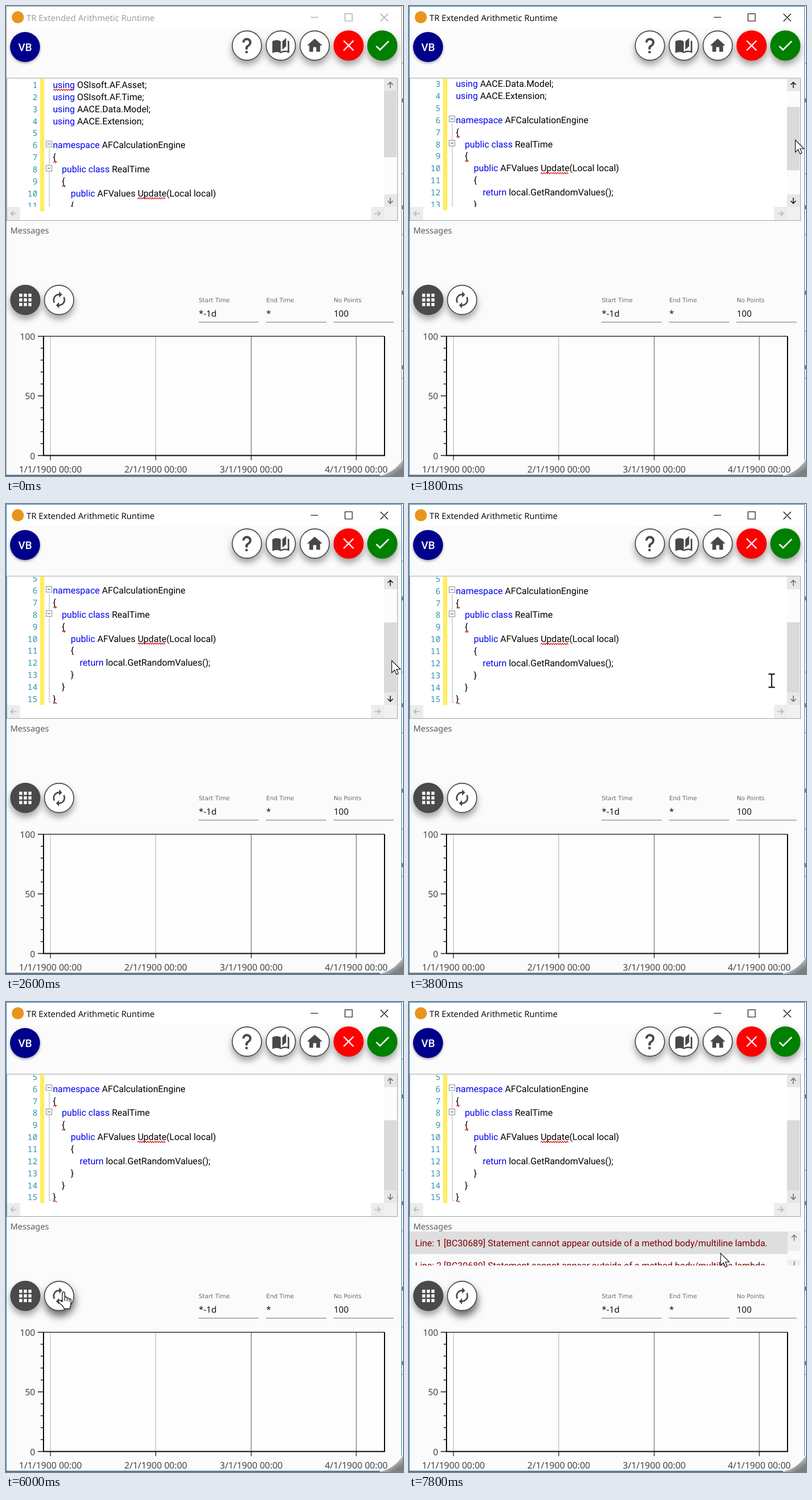
Write an HTML page that moves like this. It is 688 px wide and 814 px high and loops after 8000 ms.

```html
<!DOCTYPE html>
<html lang="en">
<head>
<meta charset="utf-8">
<title>Calculation editor</title>
<style>
  html, body { margin: 0; width: 100%; height: 100%; overflow: hidden; background: #fff; }
  svg { display: block; width: 688px; height: 814px; }
  text { font-family: "Noto Sans", sans-serif; text-rendering: geometricPrecision; white-space: pre; }
  .ui { font-family: "Open Sans", sans-serif; }
  .code text, .msg text { font: 15.7px Roboto, sans-serif; }
  .code text.num { font: 14.3px "Noto Sans Mono", monospace; fill: #2b91af; text-anchor: end; }
  .key { fill: #0000f0; }
  .msg text { fill: #800000; }
  .line { fill: none; }
  .raised { filter: drop-shadow(0 7px 6px rgba(0, 0, 0, .36)); }
  .hovered { filter: drop-shadow(1px 9px 7px rgba(0, 0, 0, .6)); }
  .low { filter: drop-shadow(0 2px 2px rgba(0, 0, 0, .35)); }
</style>
</head>
<body>
<svg id="stage" viewBox="0 0 688 814"></svg>
<script>
const LOOP = 8000, STEP = 200;
const LINE = 20.87, CODE_TOP = 126, CODE_BOTTOM = 348;

const icons = {
  help: 'M10 19H13V22H10ZM12 2C17.35 2.22 19.68 7.62 16.5 11.67C15.67 12.67 14.33 13.33 13.67 14.17C13 15 13 16 13 17H10C10 15.33 10 13.92 10.67 12.92C11.33 11.92 12.67 11.33 13.5 10.67C15.92 8.43 15.32 5.26 12 5A3 3 0 0 0 9 8H6A6 6 0 0 1 12 2Z',
  book: 'M19 2L14 6.5V17.5L19 13ZM6.5 5C4.55 5 2.45 5.4 1 6.5V21.2Q1.2 21.8 1.75 21.6C3.1 20.9 5 20.5 6.5 20.5C8.5 20.5 10.5 20.9 12 22C13.4 21.1 15.8 20.5 17.5 20.5C19 20.5 20.8 20.8 22.3 21.6Q22.8 21.7 23 21.1V6.5Q22 5.8 21 5.5V19C19.9 18.7 18.7 18.5 17.5 18.5C15.8 18.5 13.4 19.1 12 20V6.5C10.5 5.4 8.5 5 6.5 5Z',
  home: 'M10 20V14H14V20H19V12H22L12 3L2 12H5V20Z',
  close: 'M19 6.2L17.8 5L12 10.8L6.2 5L5 6.2L10.8 12L5 17.8L6.2 19L12 13.2L17.8 19L19 17.8L13.2 12Z',
  check: 'M21 7L9 19L3.5 13.5L4.9 12.1L9 16.2L19.6 5.6Z',
  apps: [4, 10, 16].map(y => [4, 10, 16].map(x => `M${x} ${y}h4v4h-4Z`).join('')).join(''),
  refresh: 'M12 6V9L16 5L12 1V4A8 8 0 0 0 4 12C4 13.6 4.5 15 5.2 16.3L6.7 14.8C6.2 14 6 13 6 12A6 6 0 0 1 12 6ZM18.8 7.7L17.3 9.2C17.7 10 18 11 18 12A6 6 0 0 1 12 18V15L8 19L12 23V20A8 8 0 0 0 20 12C20 10.4 19.5 9 18.8 7.7Z'
};

// Indent level, then the text; a bar ends the keyword part.
const code = [
  [0, 'using| OSIsoft.AF.Asset;'], [0, 'using| OSIsoft.AF.Time;'],
  [0, 'using| AACE.Data.Model;'], [0, 'using| AACE.Extension;'], [0, '|'],
  [0, 'namespace| AFCalculationEngine'], [0, '|{'],
  [1, 'public class| RealTime'], [1, '|{'],
  [2, 'public| AFValues Update(Local local)'], [2, '|{'],
  [3, 'return| local.GetRandomValues();'], [2, '|}'], [1, '|}'], [0, '|}']
];

const rect = (x, y, w, h, fill, extra = '') =>
  `<rect x="${x}" y="${y}" width="${w}" height="${h}" fill="${fill}" ${extra}/>`;
const path = (d, stroke, width = 1, extra = '') =>
  `<path class="line" d="${d}" stroke="${stroke}" stroke-width="${width}" ${extra}/>`;
const label = (x, y, size, text, fill, extra = '') =>
  `<text x="${x}" y="${y}" font-size="${size}" fill="${fill}" ${extra}>${text}</text>`;
const button = (x, y, icon, fill, ink, rim = fill, id = '') =>
  `<circle ${id} class="raised" cx="${x}" cy="${y}" r="25.4" fill="${fill}" stroke="${rim}" stroke-width="1.6"/>
   <path d="${icons[icon]}" fill="${ink}" transform="translate(${x - 16} ${y - 16}) scale(1.333)"/>`;
const arrow = (x, y, turn, stroke, extra = '') =>
  path('M0 5V-5M-4.5 -.5L0 -5L4.5 -.5', stroke, 1.5, `transform="translate(${x} ${y}) rotate(${turn})" ${extra}`);

function squiggle(x1, x2, y) {
  let d = `M${x1} ${y + 2}`;
  for (let x = x1 + 2, up = true; x <= x2; x += 2, up = !up) d += `L${x} ${up ? y : y + 2.4}`;
  return path(d, '#e00000', 1.1);
}

function codeLines() {
  const base = i => 142 + i * LINE;
  const rows = code.map(([indent, text], i) => {
    const [key, rest] = text.split('|');
    return `<text class="num" x="54.5" y="${base(i)}">${i + 1}</text>
      <text x="${81.2 + indent * 15.55}" y="${base(i)}"><tspan class="key">${key}</tspan>${rest}</text>`;
  }).join('');
  const folds = [5, 7].map(i => {
    const y = Math.round(base(i) - 7);
    return rect(69.5, y - 5, 10, 10, '#fff', 'stroke="#8c8c8c"') + path(`M72 ${y}h5`, '#444');
  }).join('');
  return path(`M75 ${base(5)}V${base(14)}H79`, '#b4b4b4') + folds + rows +
    squiggle(82, 119, base(0) + 2) + squiggle(82, 88, base(6) + 2) +
    squiggle(97, 103, base(8) + 2) + squiggle(228, 277, base(9) + 2) + squiggle(84, 89, base(14) + 1);
}

function chart() {
  const top = 572, bottom = 778.5, left = 65, right = 656;
  let out = rect(left, top, right - left, bottom - top, '#fdfdfd');
  [77, 259.5, 425, 607].forEach((x, i) => {
    out += path(`M${x} ${top}V${bottom}`, i < 2 ? '#b2b2b2' : '#8a8a8a', i < 2 ? 1 : 1.5);
    out += path(`M${x} ${bottom}v8`, '#222', 1.3);
    out += label(x, 808, 15.6, `${i + 1}/1/1900 00:00`, '#444', 'text-anchor="middle"');
  });
  for (let i = 0; i <= 10; i++) {
    const y = top + (bottom - top) * i / 10;
    out += path(`M${i % 5 ? 60 : 55} ${y}H${left}`, '#111', 1.4);
    if (i % 5 === 0) out += label(50.5, y + 6, 15.4, 100 - i * 10, '#444', 'text-anchor="end"');
  }
  return out + path(`M${left} ${top}H${right}`, '#333', 1.3) +
    path(`M${left} ${top}V${bottom}H${right}V${top}`, '#0a0a0a', 2);
}

const field = (x, name, value) =>
  `<text x="${x}" y="513" fill="#6c6c6c" style="font:10.3px 'DejaVu Sans',sans-serif">${name}</text>` +
  label(x, 538, 15, value, '#111') + path(`M${x - .5} 547.5h104.5`, '#777');

const message = n => `Line: ${n} [BC30689] Statement cannot appear outside of a method body/multiline lambda.`;

const stage = document.getElementById('stage');
stage.innerHTML = `
  <defs>
    <clipPath id="codeClip">${rect(2, CODE_TOP, 653, CODE_BOTTOM - CODE_TOP, '#fff')}</clipPath>
    <clipPath id="msgClip">${rect(1, 397, 678, 59.5, '#fff')}</clipPath>
    <linearGradient id="curl" x2="1" y2="1"><stop offset=".35" stop-color="#e4e6e6"/><stop offset=".8" stop-color="#7c8080"/></linearGradient>
  </defs>
  ${rect(0, 0, 688, 814, '#fdfdfd')}
  ${rect(1, 39, 684, 773, '#fbfbfb')}
  ${rect(1, 1, 684, 38, '#fff')}
  <circle cx="20.5" cy="19.5" r="10.5" fill="#e8951c"/>
  <g id="titleText">${label(35.5, 25.5, 14.7, 'TR Extended Arithmetic Runtime', 'currentColor', 'class="ui"')}
    ${path('M528 19.5H541M587.5 13.5H600V26H587.5ZM649 13.5L662 26.5M662 13.5L649 26.5', 'currentColor', 1.1)}</g>
  <circle class="low" cx="33" cy="71" r="26" fill="#00008b"/>
  ${label(33, 78, 18.5, 'VB', '#fff', 'text-anchor="middle" style="font-family:Roboto,sans-serif;font-weight:500"')}
  ${button(417.5, 68.5, 'help', '#fff', '#484848', '#484848')}
  ${button(476.2, 68.5, 'book', '#fff', '#484848', '#484848')}
  ${button(535, 68.5, 'home', '#fff', '#484848', '#484848')}
  ${button(593.7, 68.5, 'close', '#fe0000', '#fff')}
  ${button(652.2, 68.5, 'check', '#008000', '#fff')}

  ${rect(1.5, 125, 677, 246.5, '#fff', 'stroke="#a3a3a3"')}
  <rect id="bar" x="59" y="126" width="7.5" height="229" fill="#ffee62"/>
  <g class="code" clip-path="url(#codeClip)"><g id="codeText">${codeLines()}</g></g>
  ${rect(655, 126, 23, 222, '#fcfcfc')}
  ${rect(655, 126, 23, 21.5, '#e7e7e7')}${rect(655, 326, 23, 22, '#e7e7e7')}
  ${rect(655, 147, 22, 115, '#dadada', 'id="thumb"')}
  <g id="scrollArrows">${arrow(666, 137, 0, 'currentColor')}${arrow(666, 337, 180, 'currentColor')}</g>
  ${rect(2, 348, 22.5, 23, '#ececec')}${rect(632.5, 348, 22.5, 23, '#ececec')}${rect(655, 348, 23, 23, '#f1f1f1')}
  ${arrow(13.5, 359.5, -90, '#b5b5b5')}${arrow(643.5, 359.5, 90, '#b5b5b5')}

  ${label(7.5, 394, 14.4, 'Messages', '#5c5c5c')}
  <g id="messages" class="msg" clip-path="url(#msgClip)">
    ${rect(1, 397.5, 655, 39, '#dedede', 'id="row"')}
    <text x="10.5" y="423">${message(1)}</text><text x="10.5" y="462">${message(2)}</text>
    ${rect(656, 397, 22.5, 34, '#eeeeee')}${rect(656, 446, 22.5, 11, '#eeeeee')}
    ${path('M656 419.5h22', '#f8f8f8', 1)}
    <g id="msgArrows">${arrow(667.5, 408.5, 0, 'currentColor')}${path('M667.5 449v8', 'currentColor', 1.4)}</g>
  </g>

  ${button(33.5, 509, 'apps', '#4a4a4a', '#fff')}
  ${button(92, 509, 'refresh', '#fff', '#484848', '#484848', 'id="refresh"')}
  ${field(334, 'Start Time', '*-1d')}${field(451, 'End Time', '*')}${field(568, 'No Points', '100')}
  ${chart()}
  <g id="tooltip">${rect(42.5, 547, 98.5, 41.5, '#757575', 'rx="2"')}
    ${label(53, 574, 14.7, 'Recalculate', '#fff', 'class="ui"')}</g>

  <path d="M644 814Q672 810 688 785V814Z" fill="url(#curl)"/>
  ${[98, 160, 290, 345, 395, 493, 562, 622, 644].map((y, i) => rect(686.5, y, 1.5, i % 2 ? 7 : 2, i % 2 ? '#555' : '#8aa5c4')).join('')}
  <g id="frame">${path('M.5 814V.5H685.5V786', 'currentColor')}${path('M0 812.8H648', '#1f4565', 1.6)}</g>

  <g id="arrow"><path d="M0 0V21.2L5 16.5L8.2 24L11.4 22.6L8.2 15.3H15Z" fill="#fff" stroke="#111" stroke-width="1.1"/></g>
  <g id="beam">${path('M-5.5 -11.5H-2Q0 -11.5 0 -9.5Q0 -11.5 2 -11.5H5.5M0 -10V10M-5.5 11.5H-2Q0 11.5 0 9.5Q0 11.5 2 11.5H5.5', '#000', 1.9)}</g>
  <g id="hand"><path d="M-2.2 17V2A2.2 2.2 0 0 1 2.2 2V10A2 2 0 0 1 6.2 11A2 2 0 0 1 9.8 12.3A1.7 1.7 0 0 1 12.8 14V20C12.8 24 11 25 11 29H1C1 25 -4.5 22 -8.3 17.5C-10 15 -7.5 13 -5.2 14.6ZM2.2 10V15.5M6.2 11V16M9.8 12.3V16.5" fill="#fff" stroke="#111" stroke-width="1.2" stroke-linejoin="round"/></g>`;

const part = Object.fromEntries([...stage.querySelectorAll('[id]')].map(el => [el.id, el]));

// time, scroll offset, thumb bottom
const scrollKeys = [
  [800, 0, 262], [1800, 43.5, 284.5], [2600, 91.3, 326],
  [2800, 91.3, 326], [3000, 91, 326], [3200, 90.7, 326]
];
// time, x, y
const pointerKeys = [
  [600, 669, 203], [800, 669, 203], [1800, 669.5, 232], [2600, 668.5, 271], [3600, 668.5, 271],
  [3800, 628.5, 306], [4000, 510, 355], [4200, 350, 420], [4400, 215, 470], [4600, 125, 500],
  [4800, 101, 506], [5000, 97, 503], [5800, 97, 503], [6400, 105, 501], [6800, 108, 501],
  [7000, 165, 490], [7200, 290, 466], [7400, 420, 449], [7600, 505, 441], [7800, 540, 435]
];

function sample(keys, t) {
  const next = keys.findIndex(k => k[0] > t);
  if (next < 0) return keys.at(-1).slice(1);
  if (next === 0) return keys[0].slice(1);
  const a = keys[next - 1], b = keys[next], p = (t - a[0]) / (b[0] - a[0]);
  return a.slice(1).map((v, i) => v + (b[i + 1] - v) * p);
}

const show = (el, on) => el.setAttribute('display', on ? 'inline' : 'none');
const place = (el, x, y) => el.setAttribute('transform', `translate(${x} ${y})`);

function render(t) {
  const active = t >= 600;
  const [scroll, thumbBottom] = sample(scrollKeys, t);
  const [x, y] = sample(pointerKeys, t);

  part.titleText.style.color = active ? '#000' : '#999';
  part.frame.style.color = active ? '#2583c6' : '#9c9c9c';

  place(part.codeText, 0, -scroll);
  const view = CODE_BOTTOM - CODE_TOP;
  const lastLine = Math.min(code.length, Math.ceil((view + scroll) / LINE));
  part.bar.setAttribute('height', Math.max(view, lastLine * LINE - scroll));
  const thumbTop = 147 + scroll * 58 / 91;
  part.thumb.setAttribute('y', thumbTop);
  part.thumb.setAttribute('height', thumbBottom - thumbTop);
  part.scrollArrows.style.color = active && t < 3800 ? '#111' : '#6a6a6a';

  const hasMessages = t >= 6200;
  const overList = t >= 7000 && y < 456;
  show(part.messages, hasMessages);
  show(part.row, overList);
  part.row.setAttribute('y', y < 436.5 ? 397.5 : 436.5);
  part.msgArrows.style.color = overList ? '#777' : '#b0b0b0';

  part.refresh.setAttribute('class', t >= 4600 ? 'hovered' : 'raised');
  show(part.tooltip, t >= 5200 && t < 6000);

  const onButton = t >= 4600 && t < 7000;
  const inEditor = t >= 3800 && x < 655 && y < CODE_BOTTOM;
  const kind = onButton ? 'hand' : inEditor ? 'beam' : 'arrow';
  for (const name of ['arrow', 'beam', 'hand']) {
    show(part[name], active && name === kind);
    place(part[name], x, y);
  }
}

const start = performance.now();
function tick() {
  const t = (performance.now() - start) % LOOP;
  render(Math.floor(t / STEP) * STEP);
  requestAnimationFrame(tick);
}
tick();
</script>
</body>
</html>
```
